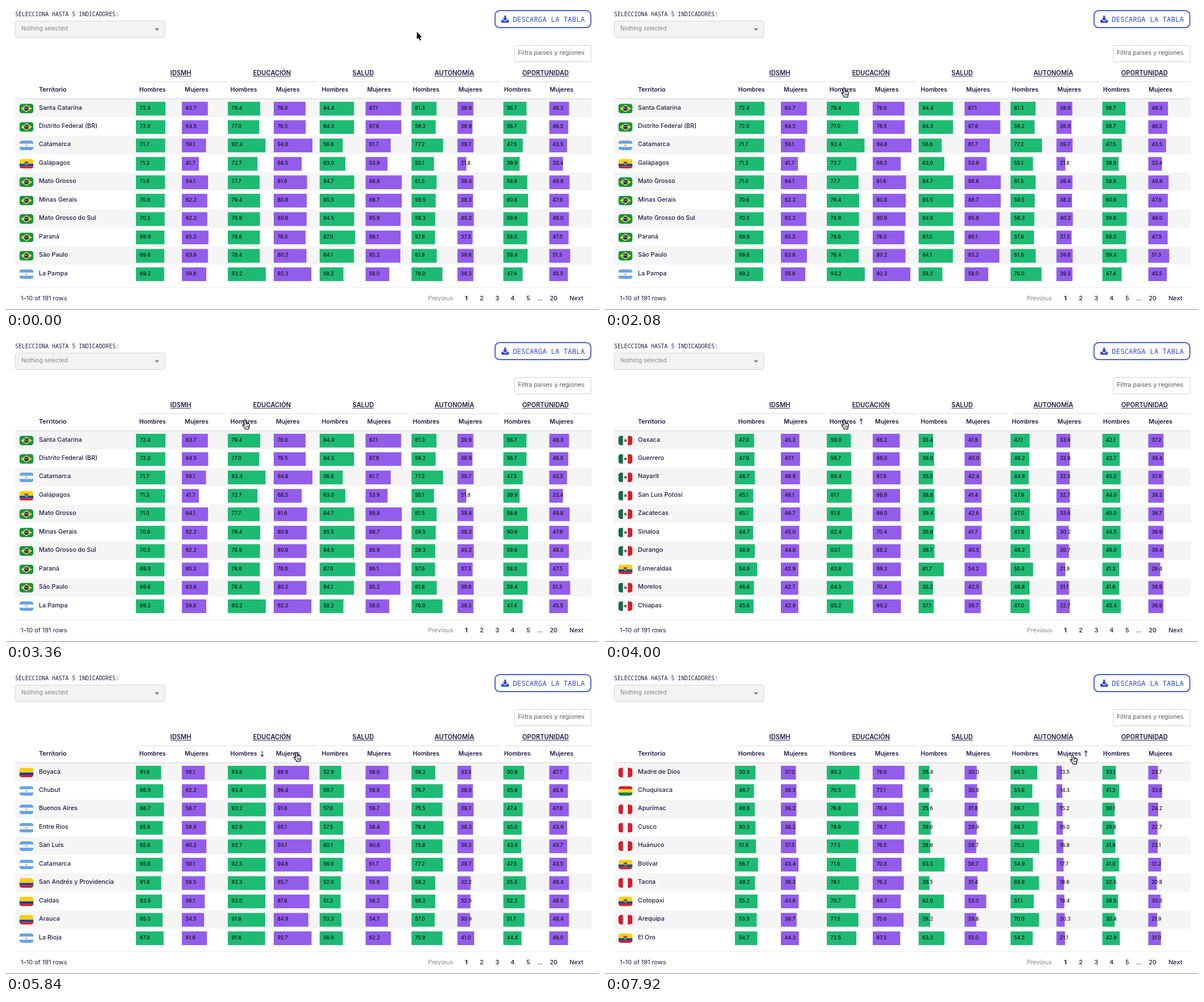
These frames come from a looping animation (1045 px wide and 536 px high, 8000 ms). An HTML page with a canvas:

```html
<!DOCTYPE html>
<html lang="es">
<head>
<meta charset="utf-8">
<title>Tabla de indicadores</title>
<style>
html, body { margin: 0; width: 100%; height: 100%; overflow: hidden; background: #fff; }
canvas { display: block; width: 1045px; height: 536px; }
</style>
</head>
<body>
<canvas id="stage"></canvas>
<script>
const W = 1045, H = 536, LOOP = 8000;
const canvas = document.getElementById('stage');
const dpr = window.devicePixelRatio || 1;
canvas.width = W * dpr;
canvas.height = H * dpr;
const ctx = canvas.getContext('2d');

const SANS = 'Inter, Roboto, sans-serif';
const MONO = '"Noto Sans Mono", "DejaVu Sans Mono", monospace';
const INK = '#1f1b45', BLUE = '#3049d4', GREEN = '#1dbb72', PURPLE = '#935ceb';
const ROW_TOP = 164, ROW_H = 32.44, SPREAD = 2.5;

// Typical men/women scores of a country, one pair per indicator
const profiles = {
  br: [71, 63, 79, 80, 86, 87, 60, 38, 59, 49],
  ar: [68, 60, 92, 94, 59, 60, 77, 39, 46, 46],
  ec: [57, 44, 71, 69, 62, 55, 55, 21, 41, 31],
  mx: [47, 45, 63, 68, 37, 41, 46, 32, 44, 38],
  co: [64, 55, 92, 87, 52, 54, 57, 31, 53, 46],
  pe: [51, 37, 78, 78, 28, 31, 68, 18, 31, 23],
  bo: [49, 38, 73, 71, 27, 31, 55, 15, 40, 33]
};

// Random numbers seeded by a name, so a territory keeps its scores on every page
function seeded(name) {
  let s = [...name].reduce((h, c) => (h * 31 + c.charCodeAt(0)) >>> 0, 7);
  return () => (s = (s * 1664525 + 1013904223) >>> 0) / 2 ** 32;
}

// The sorted column runs evenly between two scores, the others vary around the profile
function makeRows(list, col, from, to) {
  const entries = list.split(', ');
  return entries.map((entry, r) => {
    const [name, flag] = entry.split('|');
    const rnd = seeded(name);
    const values = profiles[flag].map(v => v + (rnd() * 2 - 1) * SPREAD);
    values[col] = from + (to - from) * r / (entries.length - 1);
    return { name, flag, values };
  });
}

// Table states: start time, rows, sort arrow position and direction
const states = [
  {
    at: 0,
    rows: makeRows('Santa Catarina|br, Distrito Federal (BR)|br, Catamarca|ar, Galápagos|ec, Mato Grosso|br, ' +
      'Minas Gerais|br, Mato Grosso do Sul|br, Paraná|br, São Paulo|br, La Pampa|ar', 0, 72.4, 69.2)
  },
  {
    at: 3440, arrowX: 451.5, dir: -1,
    rows: makeRows('Oaxaca|mx, Guerrero|mx, Nayarit|mx, San Luis Potosí|mx, Zacatecas|mx, ' +
      'Sinaloa|mx, Durango|mx, Esmeraldas|ec, Morelos|mx, Chiapas|mx', 2, 59, 65.2)
  },
  {
    at: 4700, arrowX: 451.5, dir: 1,
    rows: makeRows('Boyacá|co, Chubut|ar, Buenos Aires|ar, Entre Ríos|ar, San Luis|ar, ' +
      'Catamarca|ar, San Andrés y Providencia|co, Caldas|co, Arauca|co, La Rioja|ar', 2, 93.6, 91.6)
  },
  {
    at: 7440, arrowX: 847.5, dir: -1,
    rows: makeRows('Madre de Dios|pe, Chuquisaca|bo, Apurímac|pe, Cusco|pe, Huánuco|pe, ' +
      'Bolívar|ec, Tacna|pe, Cotopaxi|ec, Arequipa|pe, El Oro|ec', 7, 13.5, 21.1)
  }
];

// Pointer path: time, x, y
const path = [
  [0, 724, 45.5], [320, 726, 48], [880, 764, 102], [1040, 467, 95], [1120, 467, 95],
  [1360, 455, 98], [1560, 452, 101], [2080, 421, 145], [5520, 421, 145],
  [6480, 768, 147], [6720, 768, 147], [7200, 824, 150], [LOOP, 824, 150]
];

function text(str, x, y, size, color = INK, weight = 400, align = 'left', family = SANS) {
  ctx.font = `${weight} ${size}px ${family}`;
  ctx.fillStyle = color;
  ctx.textAlign = align;
  ctx.fillText(str, x, y);
}

function rect(x, y, w, h, color) {
  ctx.fillStyle = color;
  ctx.fillRect(x, y, w, h);
}

function box(x, y, w, h, r, stroke, width, fill) {
  ctx.beginPath();
  ctx.roundRect(x, y, w, h, r);
  ctx.fillStyle = fill;
  ctx.fill();
  ctx.strokeStyle = stroke;
  ctx.lineWidth = width;
  ctx.stroke();
}

function shape(points, color) {
  ctx.beginPath();
  points.forEach(([x, y]) => ctx.lineTo(x, y));
  ctx.closePath();
  ctx.fillStyle = color;
  ctx.fill();
}

function dot(x, y, r, color) {
  ctx.beginPath();
  ctx.arc(x, y, r, 0, Math.PI * 2);
  ctx.fillStyle = color;
  ctx.fill();
}

function bands(colors, sizes, vertical) {
  let p = 0;
  colors.forEach((c, i) => {
    if (vertical) rect(p, 0, sizes[i], 17, c);
    else rect(0, p, 25, sizes[i], c);
    p += sizes[i];
  });
}

const THIRDS = [5.7, 5.6, 5.7], HALF_TOP = [8.5, 4.2, 4.3], COLUMNS = [8.3, 8.4, 8.3];

const flags = {
  br() {
    rect(0, 0, 25, 17, '#149447');
    shape([[12.5, 2], [22.5, 8.5], [12.5, 15], [2.5, 8.5]], '#f8d21c');
    dot(12.5, 8.5, 4, '#17317f');
    ctx.beginPath();
    ctx.arc(11, 14, 6.6, -1.9, -0.85);
    ctx.strokeStyle = '#dce6ee';
    ctx.lineWidth = 0.8;
    ctx.stroke();
  },
  ar() {
    bands(['#65a4e3', '#f7f9fb', '#65a4e3'], THIRDS);
    dot(12.5, 8.5, 1.8, '#edb53c');
  },
  ec() {
    bands(['#fccf18', '#17479d', '#d4202a'], HALF_TOP);
    dot(12.5, 8.7, 3.2, '#6b6a45');
    dot(12.5, 9, 1.7, '#5c9fae');
    rect(9, 5, 7, 1.2, '#4d3c28');
  },
  co() { bands(['#fccd16', '#1d3f94', '#d22230'], HALF_TOP); },
  mx() {
    bands(['#146a49', '#fafafa', '#d0202d'], COLUMNS, true);
    dot(12.5, 8.5, 2.5, '#8a7850');
    dot(12.5, 8.2, 1.2, '#5f4c2c');
  },
  pe() { bands(['#d81e2c', '#fafafa', '#d81e2c'], COLUMNS, true); },
  bo() { bands(['#d5252f', '#f8dc23', '#188040'], THIRDS); }
};

function drawFlag(kind, x, y) {
  ctx.save();
  ctx.translate(x, y);
  ctx.beginPath();
  ctx.roundRect(0, 0, 25, 17, 5);
  ctx.clip();
  flags[kind]();
  ctx.restore();
}

function drawControls() {
  text('SELECCIONA HASTA 5 INDICADORES:', 16, 18, 9.85, INK, 500, 'left', MONO);
  box(16.5, 26.5, 263.5, 29, 3, '#d4d4d4', 1, '#f3f3f3');
  text('Nothing selected', 27, 43, 10.2, '#858585');
  shape([[262, 39.5], [270, 39.5], [266, 43.5]], '#777');

  box(861.8, 8.2, 168.8, 30, 8, BLUE, 1.7, '#fff');
  text('DESCARGA LA TABLA', 893, 28, 12.45, BLUE, 400, 'left', MONO);
  rect(878, 17, 3.2, 5, BLUE);
  shape([[875, 21.5], [884.2, 21.5], [879.6, 26.2]], BLUE);
  shape([[873, 24.5], [876.2, 24.5], [879.6, 27.6], [883, 24.5], [886, 24.5], [886, 29.5], [873, 29.5]], BLUE);

  box(896, 69.5, 135, 29, 2, '#cfcfcf', 1, '#fff');
  text('Filtra países y regiones', 902, 86, 10.75, '#5a5a5a');
}

function drawHeader() {
  ['IDSMH', 'EDUCACIÓN', 'SALUD', 'AUTONOMÍA', 'OPORTUNIDAD'].forEach((title, i) => {
    const mid = 308 + 160.7 * i;
    text(title, mid, 122, 11.1, INK, 600, 'center');
    const w = ctx.measureText(title).width;
    rect(mid - w / 2, 123.4, w, 1, INK);
    rect(235 + 160.8 * i, 133, 153.5, 1, '#dcdcdc');
  });
  text('Territorio', 58, 151, 10.9, INK, 600);
  for (let i = 0; i < 10; i++) {
    text(i % 2 ? 'Mujeres' : 'Hombres', 234.7 + 80.38 * i, 151, 10.7, INK, 600);
  }
  rect(16, 163, 1016, 1, '#d6d6d6');
}

function drawArrow(x, dir) {
  const tip = 147.5 + dir * 5;
  ctx.beginPath();
  ctx.moveTo(x, 147.5 - dir * 5);
  ctx.lineTo(x, tip);
  ctx.moveTo(x - 2.6, tip - dir * 3);
  ctx.lineTo(x, tip);
  ctx.lineTo(x + 2.6, tip - dir * 3);
  ctx.strokeStyle = INK;
  ctx.lineWidth = 1.1;
  ctx.stroke();
}

function drawRows(rows) {
  rows.forEach((row, r) => {
    const y = ROW_TOP + ROW_H * r;
    if (r % 2 === 0) rect(16, y, 1016, ROW_H, '#f5f5f5');
    drawFlag(row.flag, 23.5, y + 8.3);
    text(row.name, 58, y + 18.6, 10.8, INK, 500);
    row.values.forEach((v, i) => {
      rect(229 + 80.93 * i, y + 4.9, v * 0.719, 24.2, i % 2 ? PURPLE : GREEN);
      text(v.toFixed(1), 236 + 80.8 * i, y + 18.6, 8.8, '#111', 500);
    });
  });
}

function drawFooter() {
  rect(16, 496, 1016, 1, '#ececec');
  text('1–10 of 191 rows', 26, 518.5, 10.9);
  text('Previous', 743.5, 518.5, 10.9, '#86848f');
  ['1', '2', '3', '4', '5', '...', '20'].forEach((p, i) => {
    const x = i < 5 ? 811 + 27.3 * i : i === 5 ? 941 : 965;
    text(p, x, 518.5, 10.9, INK, i ? 500 : 700, 'center');
  });
  text('Next', 993, 518.5, 10.9, INK, 500);
  rect(0, 535, W, 1, '#8b8b8b');
}

const arrowCursor = new Path2D('M0 0V13.2L3 10.5L5.1 15.4L7.4 14.4L5.3 9.7H9.3Z');
const handCursor = new Path2D('M-1.4 1Q-1.2-.5 0-.5Q1.3-.4 1.5 1L2 5Q3.4 4.2 4.2 5.3Q5.5 4.8 6.2 6Q8 5.7 8.2 7.5Q8.6 10.5 7 13V15.7H.2V14.2Q-1.8 12-4 8.8Q-4.3 7.3-2.8 7.4L-.6 9.2Z');
const handCreases = new Path2D('M2 9.5V13M4 9.5V13M6 9.5V13M2 5V8M4.2 5.5V8');

function drawCursor(x, y) {
  ctx.save();
  ctx.translate(x, y);
  ctx.lineJoin = 'round';
  if (y > 132) {
    ctx.fillStyle = '#fff';
    ctx.strokeStyle = '#111';
    ctx.lineWidth = 1.2;
    ctx.fill(handCursor);
    ctx.stroke(handCursor);
    ctx.lineWidth = 0.9;
    ctx.stroke(handCreases);
  } else {
    ctx.fillStyle = '#111';
    ctx.strokeStyle = '#fff';
    ctx.lineWidth = 1.4;
    ctx.stroke(arrowCursor);
    ctx.fill(arrowCursor);
  }
  ctx.restore();
}

function pointerAt(t) {
  const i = path.findIndex(k => k[0] > t);
  const [t0, x0, y0] = path[i - 1], [t1, x1, y1] = path[i];
  const u = (t - t0) / (t1 - t0), e = u * u * (3 - 2 * u);
  return [x0 + (x1 - x0) * e, y0 + (y1 - y0) * e];
}

function draw(t) {
  ctx.setTransform(dpr, 0, 0, dpr, 0, 0);
  rect(0, 0, W, H, '#fff');
  const state = states.filter(s => s.at <= t).pop();
  drawControls();
  drawHeader();
  drawRows(state.rows);
  if (state.dir) drawArrow(state.arrowX, state.dir);
  drawFooter();
  drawCursor(...pointerAt(t));
}

const start = performance.now();
function tick() {
  draw(Math.max(0, performance.now() - start) % LOOP);
  requestAnimationFrame(tick);
}
tick();
</script>
</body>
</html>
```
